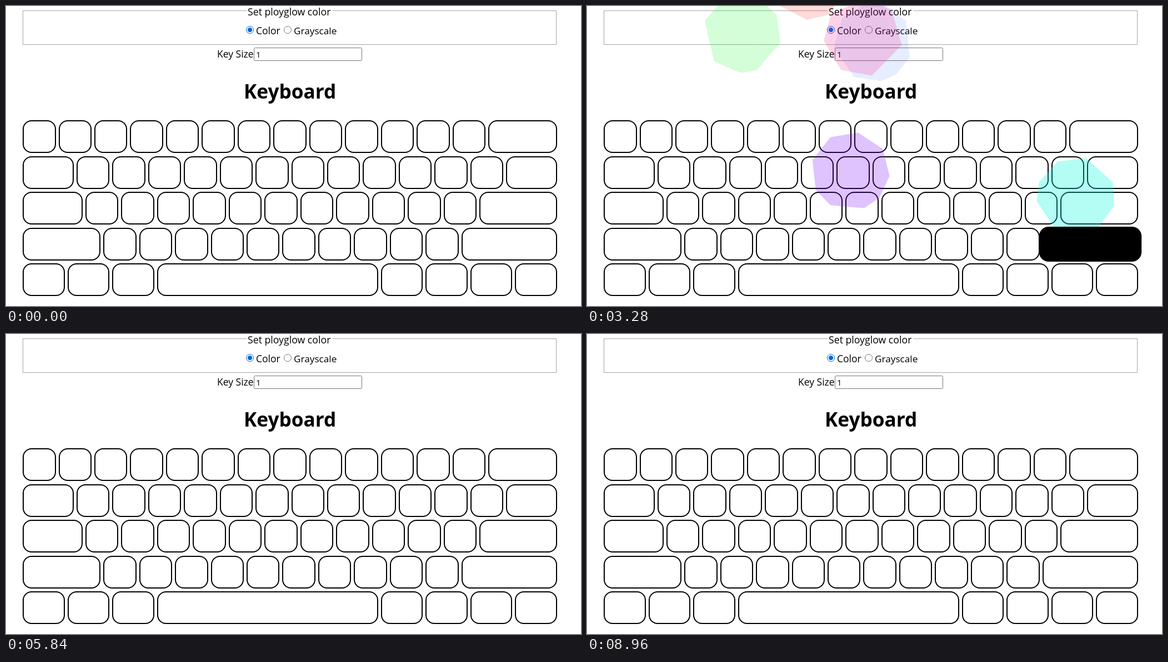
An HTML page with a canvas for the animation above (9.04 s loop, 1035 by 541 pixels).

```html
<!DOCTYPE html>
<html lang="en">
<head>
<meta charset="utf-8">
<title>Keyboard</title>
<style>
  html, body { margin: 0; width: 100%; height: 100%; overflow: hidden; background: #fff; }
  canvas { display: block; }
</style>
</head>
<body>
<canvas id="stage" width="1035" height="541"></canvas>
<script>
const ctx = document.getElementById('stage').getContext('2d');
const LOOP = 9040, SPEED = 0.4, LIFE = 1500, HOLD = 300, ALPHA = 0.36, RADIUS = 71;
const LEFT = 30.1, TOP = 206.3, UNIT = 64.46, GAP = 5, KEY_H = 59;
const FONT = '"Open Sans", "Noto Sans", sans-serif';

// Key widths in units; the last key fills each row to 15 units
const ones = n => Array(n).fill(1);
const rows = [
  ones(13),
  [1.5, ...ones(12)],
  [1.75, ...ones(11)],
  [2.25, ...ones(10)],
  [1.25, 1.25, 1.25, 6.25, 1.25, 1.25, 1.25]
].map((widths, row) => {
  const used = widths.reduce((sum, w) => sum + w, 0);
  const y = Math.round(TOP + row * UNIT);
  let at = LEFT;
  return [...widths, 15 - used].map(units => {
    const x = Math.round(at);
    at += units * UNIT;
    return { x, y, w: Math.round(at - GAP) - x, h: KEY_H };
  });
});

function noise(seed) {
  const v = Math.sin(seed * 12.9898) * 43758.5453;
  return v - Math.floor(v);
}

// Uneven corners on a circle
function corners(seed) {
  const n = 7 + Math.floor(noise(seed) * 3);
  const turn = noise(seed + 0.5);
  return Array.from({ length: n }, (_, i) =>
    (i + turn + 0.6 * (noise(seed + i * 7.3) - 0.5)) / n * 2 * Math.PI);
}

// Each press: time, row, x, hue; the key is the one under x
const presses = [
  [1008, 3, 925, 275], [1249, 2, 612, 1], [1772, 4, 434, 196],
  [2212, 4, 515, 223], [2415, 1, 400, 2], [2494, 2, 279, 123],
  [2511, 2, 497, 330], [2792, 4, 474, 267], [3065, 3, 880, 173],
  [3446, 2, 687, 248], [3735, 1, 673, 108], [4265, 3, 467, 256],
  [4595, 3, 763, 54], [5980, 2, 370, 202], [6350, 1, 600, 335],
  [7379, 2, 430, 240], [7489, 2, 174, 282], [7595, 3, 690, 12],
  [7859, 2, 167, 29]
].map(([time, row, x, hue]) => {
  const key = rows[row].findLast(k => k.x <= x);
  return {
    time, key, x, y: key.y + key.h / 2,
    color: `hsl(${hue}, 95%, 51%)`, angles: corners(time)
  };
});

function roundRect(x, y, w, h, r) {
  ctx.beginPath();
  ctx.roundRect(x, y, w, h, r);
}

function disc(x, y, r) {
  ctx.beginPath();
  ctx.arc(x, y, r, 0, Math.PI * 2);
}

function label(text, x, y, size, weight = 400) {
  ctx.font = `${weight} ${size}px ${FONT}`;
  ctx.fillText(text, x, y);
}

function drawForm() {
  ctx.lineWidth = 1;
  ctx.strokeStyle = '#a4a4a4';
  ctx.strokeRect(30.5, 8.5, 960, 61);
  ctx.fillStyle = '#fff';
  ctx.fillRect(433, 6, 155, 8);

  ctx.strokeStyle = '#767676';
  roundRect(446.5, 75.5, 194, 23, 2);
  ctx.stroke();
  disc(507, 43, 6.5);
  ctx.stroke();

  ctx.strokeStyle = ctx.fillStyle = '#0067d6';
  disc(439, 43, 6.5);
  ctx.stroke();
  disc(439, 43, 4);
  ctx.fill();

  ctx.fillStyle = '#000';
  label('Set ployglow color', 435, 16.5, 17.7);
  label('Color', 450, 50.5, 17.5);
  label('Grayscale', 518, 50.5, 17.2);
  label('Key Size', 380, 92.5, 17.5);
  label('1', 450, 92.5, 15);
  label('Keyboard', 428, 167, 35.2, 700);
}

function drawKeys() {
  ctx.lineWidth = 2;
  ctx.strokeStyle = '#000';
  for (const k of rows.flat()) {
    roundRect(k.x + 1, k.y + 1, k.w - 2, k.h - 2, 15);
    ctx.stroke();
  }
}

function drawGlow(p, age) {
  const y = p.y - age * SPEED;
  ctx.globalAlpha = ALPHA * (1 - age / LIFE);
  ctx.fillStyle = p.color;
  ctx.beginPath();
  for (const a of p.angles) {
    ctx.lineTo(p.x + RADIUS * Math.cos(a), y + RADIUS * Math.sin(a));
  }
  ctx.fill();
  ctx.globalAlpha = 1;
}

function drawPressed(k, age) {
  const grow = 0.1 * age / HOLD;
  const dx = k.w * grow / 2, dy = k.h * grow / 2;
  ctx.fillStyle = '#000';
  roundRect(k.x - dx, k.y - dy, k.w + 2 * dx, k.h + 2 * dy, 16 * (1 + grow));
  ctx.fill();
}

function draw(t) {
  ctx.fillStyle = '#fff';
  ctx.fillRect(0, 0, 1035, 541);
  drawForm();
  drawKeys();
  const within = (p, span) => t >= p.time && t - p.time < span;
  for (const p of presses) if (within(p, LIFE)) drawGlow(p, t - p.time);
  for (const p of presses) if (within(p, HOLD)) drawPressed(p.key, t - p.time);
}

const start = performance.now();
function tick() {
  draw((performance.now() - start) % LOOP);
  requestAnimationFrame(tick);
}
tick();
</script>
</body>
</html>
```
